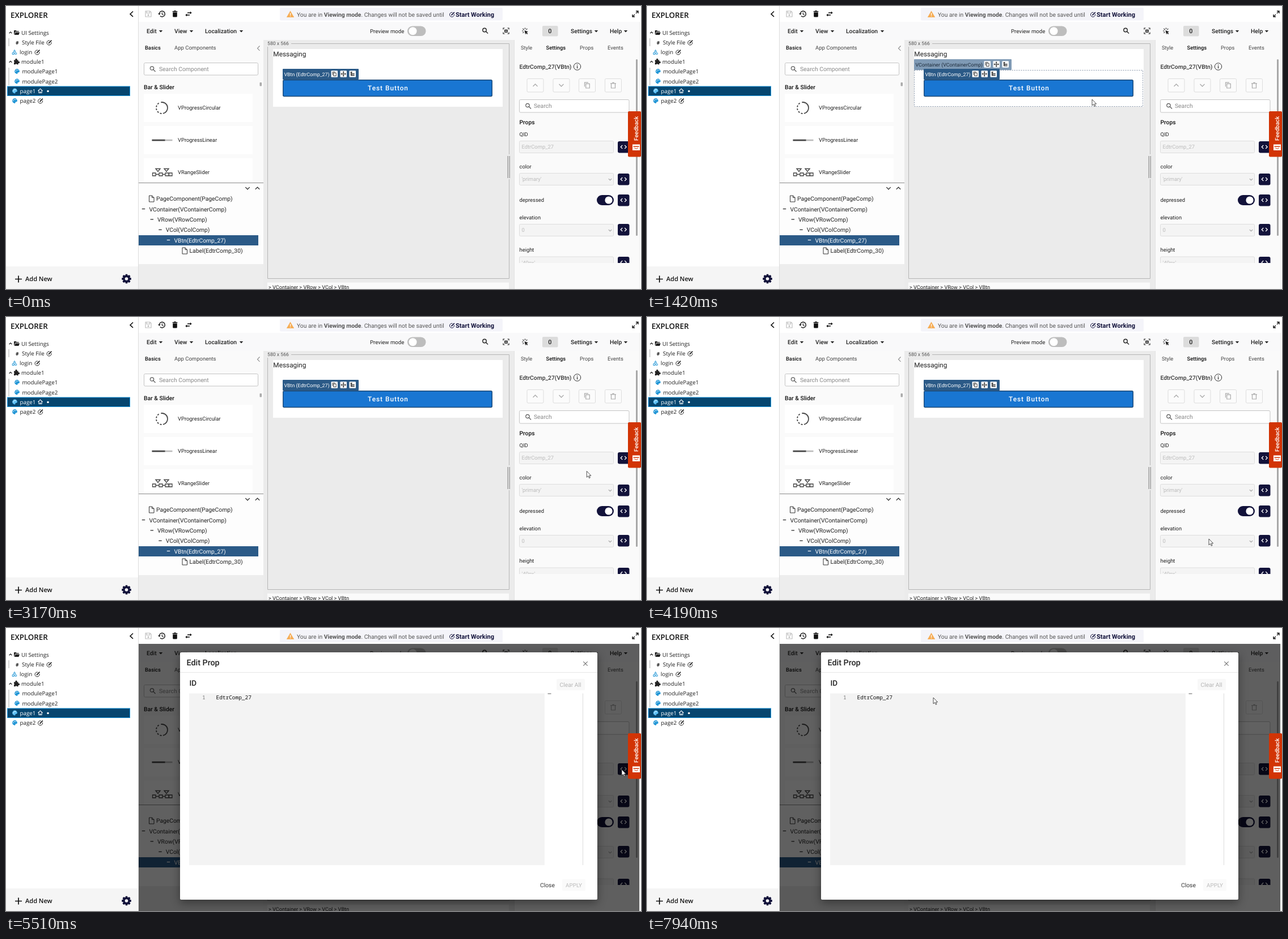
An HTML page that plays this animation: 1120x500 px, repeating every 7.99 s.

```html
<!DOCTYPE html>
<html lang="en">
<head>
<meta charset="utf-8">
<title>Component editor</title>
<style>
html, body { margin: 0; width: 100%; height: 100%; overflow: hidden; background: #fff; }
svg { display: block; width: 1120px; height: 500px; }
text { white-space: pre; text-rendering: geometricPrecision; }
</style>
</head>
<body>
<svg id="stage" viewBox="0 0 1120 500"></svg>
<script>
const INK = '#212121', NAVY = '#12123a', BLUE = '#2b5a87';
const ROBOTO = 'Roboto, sans-serif', OPEN = "'Open Sans', sans-serif", MONO = "'Noto Sans Mono', monospace";

// Drawing helpers: each returns SVG markup
const text = (x, y, str, size = 10.3, fill = INK, weight = 400, font = ROBOTO, extra = '') =>
  `<text x="${x}" y="${y}" font-size="${size}" fill="${fill}" font-weight="${weight}" font-family="${font}" ${extra}>${str}</text>`;
const rect = (x, y, w, h, fill, extra = '') =>
  `<rect x="${x}" y="${y}" width="${w}" height="${h}" fill="${fill}" ${extra}/>`;
const box = (x, y, w, h, fill, stroke, r = 2) =>
  rect(x + .5, y + .5, w - 1, h - 1, fill, `stroke="${stroke}" rx="${r}"`);
const line = (d, stroke = INK, width = 1.2, fill = 'none') =>
  `<path d="${d}" stroke="${stroke}" stroke-width="${width}" fill="${fill}"/>`;
const fill = (d, color = INK) => `<path d="${d}" fill="${color}" fill-rule="evenodd"/>`;
const dot = (x, y, r, color, stroke = 'none', w = 1) =>
  `<circle cx="${x}" cy="${y}" r="${r}" fill="${color}" stroke="${stroke}" stroke-width="${w}"/>`;
const at = (x, y, ...parts) => `<g transform="translate(${x} ${y})">${parts.join('')}</g>`;
const group = (id, ...parts) => `<g id="${id}">${parts.join('')}</g>`;

// Icons, centred on x, y
const edit = (x, y, c = INK) => at(x, y,
  line('M3.4 -.5A4 4 0 1 1 .5 -3.4', c, 1), line('M-1.5 1.6L3.8 -3.8', c, 1.7));
const palette = (x, y, c = '#2196d6') => at(x, y,
  fill('M0 -4.4A4.4 4.4 0 0 0 0 4.4C1.4 4.4 .4 2.4 1.6 1.9C3 1.5 4.4 2 4.4 0A4.4 4.4 0 0 0 0 -4.4Z', c),
  dot(-2.4, -.2, .8, '#fff'), dot(-.9, -2.4, .8, '#fff'), dot(1.5, -2.3, .8, '#fff'));
const magnifier = (x, y, c = '#555', w = 1.2) => at(x, y, dot(-1, -1, 3.2, 'none', c, w), line('M1.4 1.4L5 5', c, w));
const chevron = (x, y, s, dir, c = INK, w = 1.3) => at(x, y, line(`M${-s} ${-s * dir / 2}L0 ${s * dir / 2}L${s} ${-s * dir / 2}`, c, w));
const caret = (x, y) => fill(`M${x - 3.2} ${y - 1.5}h6.4l-3.2 3.4z`);
const trash = (x, y, c) => at(x, y, line('M-3.5 -3V5H3.5V-3M-5 -3.2H5M-1.7 -4.6H1.7', c, 1.2));
const copy = (x, y, c, s = 1) => `<g transform="translate(${x} ${y}) scale(${s})">` +
  line('M-4.5 2.5V-4.8H2', c, 1.2) + line('M-2.3 -2.6H4.3V5H-2.3Z', c, 1.2) + '</g>';
const page = (x, y) => at(x, y, line('M-4 -5.5H1L4.5 -2V5.5H-4ZM1 -5.5V-2H4.5', '#333', 1));
const minus = (x, y, c = INK) => rect(x - 2.7, y - .6, 5.4, 1.2, c);
const codeButton = y => rect(1079, y - 10, 20.5, 20.5, NAVY, 'rx="3"') +
  at(1089.2, y, line('M-2 -3L-5 0L-2 3M2 -3L5 0L2 3', '#fff', 1.3));
const tag = (x, y, w, color, label, ink) => {
  const tool = (dx, d) => rect(x + w + dx, y + 3.2, 11.5, 11.5, '#fff', 'rx="1"') + at(x + w + dx + 5.7, y + 9, d);
  return rect(x, y, w, 19, color, 'rx="1"') + text(x + 2.5, y + 12.8, label, 8.8, ink) +
    tool(-48.5, copy(0, 0, INK, .7)) +
    tool(-32.5, line('M-4 0H4M0 -4V4', INK, 1) + fill('M-4.7 0l2-1.7v3.4zM4.7 0l-2-1.7v3.4zM0 -4.7l1.7 2h-3.4zM0 4.7l1.7-2h-3.4z')) +
    tool(-16.5, line('M-3.5 -3H-.5M-2.5 -3V2.7H3.5M-2.5 0H3.5', INK, 1.3));
};

const explorer = () => {
  const row = (x, y, str, c = INK) => text(x, y + 3.6, str, 9.8, c, 400, OPEN);
  return rect(0, 0, 234, 500, '#fff') + rect(0, 460, 233, 40, '#f5f5f5') + rect(233, 0, 1, 500, '#ddd') +
    text(8, 21, 'EXPLORER', 13.3, '#111', 600, OPEN) + line('M224 9.5L219 14.2L224 19', '#111', 1.6) +
    chevron(8, 47, 2.4, -1) + fill('M14 43h3.7l1 1.2h4v1.3h-6.6l-1.5 4.5h-.6zM16.5 46.4h7.5l-1.6 4.6h-7.6z') + row(27, 47, 'UI Settings') +
    rect(4.5, 57, 1, 14, '#aaa') + text(17, 67.5, '#', 8.5, INK, 700, OPEN) + row(28, 64, 'Style File') + edit(76.5, 64.5) +
    at(15, 81.5, line('M0 -4L2 -.7H-2ZM-3.8 1H-.8V4H-3.8Z', '#2196d6', 1), dot(2.2, 2.5, 1.6, 'none', '#2196d6')) +
    row(24, 81.5, 'login') + edit(55.5, 81.5) +
    chevron(8, 98.5, 2.4, -1) + fill('M14 95.5h2.6a1.7 1.7 0 1 1 2.8 0h2.3v2.6a1.6 1.6 0 1 1 0 2.7v2.4h-2.5a1.4 1.4 0 0 0-2.6 0H14v-2.7a1.5 1.5 0 0 0 0-2.6z') +
    row(27, 98.5, 'module1') + rect(4.5, 109, 1, 31, '#aaa') +
    palette(33.5, 115.5) + row(28 + .8 + 0, 115.5, '').replace('28.8', '40') + row(28.5, 115.5, '') +
    '';
};

const modules = () => {
  const row = (x, y, str, c = INK) => text(x, y + 3.6, str, 9.8, c, 400, OPEN);
  return palette(19.5, 115.5) + row(28.5, 115.5, 'modulePage1') + palette(19.5, 133) + row(28.5, 133, 'modulePage2') +
    rect(2.5, 142, 216, 16.5, '#06466f', 'stroke="#1b94dc"') + palette(15.5, 150, '#5cc0f5') + row(24.5, 150, 'page1', '#fff') +
    line('M56.5 150L60.5 146.2L64.5 150M58 149.5V153.5H63V149.5M60.5 153.5V151', '#fff', 1.1) + dot(74, 150.5, 1.8, '#fff') +
    palette(15.5, 167.5) + row(24.5, 167.5, 'page2') + edit(61, 167.5) +
    line('M16 482.5H28M22 476.5V488.5', '#111', 1.7) + text(34, 486.3, 'Add New', 11, '#111', 600, OPEN) +
    at(212.5, 482, [0, 45, 90, 135].map(a => rect(-1.9, -8.3, 3.8, 16.6, NAVY, `rx="1" transform="rotate(${a})"`)).join(''),
      dot(0, 0, 6.4, NAVY), dot(0, 0, 2.8, '#f5f5f5'));
};

const topBar = () => rect(234, 0, 886, 28, '#fff') +
  at(251, 14, line('M-5 -5H3L5 -3V5H-5ZM-3 -4.5V-1.5H2.5V-4.5', '#bbb', 1.1), dot(0, 2, 1.5, '#bbb')) +
  at(275, 14, line('M-4.7 -.5A5 5 0 1 1 -3.2 3.6', INK, 1.4), fill('M-7 -1h4.8l-2.4 3z'), line('M.3 -2.7V.5L2.6 2', INK, 1.2)) +
  at(298, 14, fill('M-4.3 -5h2.3l.7-1h2.6l.7 1h2.3v1.4h-8.6zM-3.8 -2.8h7.6v7q0 1.3-1.3 1.3h-5q-1.3 0-1.3-1.3z', '#111')) +
  at(322, 14, line('M-2 2H-5M-4 2H2M-2 -2H4', '#111', 1.3), fill('M-5.7 2l3-2.5v5zM5.7 -2l-3-2.5v5z', '#111')) +
  rect(483, 3, 393, 22.5, '#f4f4f9', 'rx="2"') +
  fill('M501.5 8.5l6.7 11.5h-13.4z', '#f6ad55') + rect(500.9, 12.5, 1.3, 3.6, '#fff') + rect(500.9, 17, 1.3, 1.3, '#fff') +
  text(513, 18.6, 'You are in <tspan font-weight="700">Viewing mode</tspan>. Changes will not be saved until', 10.3, '#555') +
  edit(787, 14.8, NAVY) + text(793, 18.8, 'Start Working', 11, NAVY, 700) +
  at(1110, 14, line('M1 -1L4.5 -4.5M-1 1L-4.5 4.5', '#111', 1.3), line('M1 -5H5V-1M-1 5H-5V1', '#111', 1.4));

const navBar = () => rect(234, 28, 886, 32, '#f9f9fa') +
  [[248, 'Edit', 273], [297, 'View', 327], [351, 'Localization', 415], [996, 'Settings', 1041], [1065, 'Help', 1093]]
    .map(([x, str, cx]) => text(x, 48, str, 10.3, INK, 500) + caret(cx, 44.5)).join('') +
  text(642, 47.8, 'Preview mode', 9.6) + rect(708, 35.5, 32.5, 17.5, '#bdbdbd', 'rx="8.7"') + dot(717.5, 44.2, 7, '#fff') +
  magnifier(845, 43.5, INK, 1.4) +
  at(882, 44, line('M-5 -2.5V-5H-2.5M2.5 -5H5V-2.5M5 2.5V5H2.5M-2.5 5H-5V2.5', INK, 1.2), line('M-2.5 -2H2.5V2.5H-2.5ZM-2.5 0H2.5M0 -2V2.5', INK, 1)) +
  at(915.5, 44, fill('M-1 -1l6.5 2.5-2.7 1.2 2 2-1.2 1.2-2-2-1 2.5z'), line('M-2 -2L-4 -4M0 -3V-5.5M-3 0H-5.5M2 -2.2L3.7 -4M-2.3 2L-4 3.7', INK, 1.1)) +
  rect(946, 35, 27.5, 18.5, '#dcdcdc', 'rx="2"') + text(956.3, 48, '0', 10.8, INK, 500);

const palettePanel = () => rect(234, 60, 220, 253, '#fafafa') +
  text(245, 77, 'Basics', 9.3, '#111', 500) + text(297, 77, 'App Components', 9.5, '#444') + line('M447.5 70.5L443.5 74.7L447.5 79', '#888', 1.1) +
  box(243, 100, 202, 22.5, '#fff', '#c4c4c4') + magnifier(258.5, 111) + text(270, 114.8, 'Search Component', 10.3, '#888') +
  rect(447.5, 135, 3.5, 6.5, '#aaa', 'rx="1"') + text(243, 146.5, 'Bar &amp; Slider', 10.3, '#111', 500) +
  rect(243, 155, 192, 50, '#fff') + rect(243, 212, 192, 50, '#fff') + rect(243, 269, 192, 43, '#fff') +
  '<circle cx="275" cy="180" r="10" fill="none" stroke="#444" stroke-width="1.8" stroke-dasharray="31 2.5 3 2.5 3 2.5 3 2.5 3 2.5 3 5" transform="rotate(-100 275 180)"/>' +
  rect(257.5, 235.8, 36, 2.6, '#bbb') + rect(257.5, 235.8, 23, 2.6, '#444') +
  line('M258.5 295H264V300H258.5ZM287.5 295H293V300H287.5ZM264 297.5H270M276 297.5H281M270 295H276V300H270ZM281 295H287V300H281Z', '#444', 1.3) +
  line('M264 287.5H272L268 292.5ZM279 287.5H287L283 292.5Z', '#444', 1.4) +
  [['VProgressCircular', 183], ['VProgressLinear', 240.3], ['VRangeSlider', 297.3]].map(([s, y]) => text(303, y, s, 9.4)).join('');

const tree = () => rect(234, 312, 220, 144, '#fdfdfd') + rect(234, 312, 220, 1, '#8a8a8a') +
  chevron(426, 322, 3.7, 1) + chevron(443.5, 322, 3.7, -1) + rect(234, 405, 211, 18, BLUE) +
  page(256.5, 340.5) + page(315, 432.5) + minus(242.5, 358.5) + minus(257.3, 377) + minus(272, 395.3) + minus(286.5, 413.5, '#fff') +
  ['PageComponent(PageComp)', 'VContainer(VContainerComp)', 'VRow(VRowComp)', 'VCol(VColComp)', 'VBtn(EdtrComp_27)', 'Label(EdtrComp_30)']
    .map((s, i) => text([265, 252.5, 267, 281.7, 296.5, 323.5][i], 344.4 + i * 18.35, s, 10.3, i == 4 ? '#fff' : INK)).join('');

const canvasArea = () => rect(454, 60, 443, 440, '#ebebeb') +
  line('M503 66.5H887.5V262M887.5 306V481.5H461.5V72', '#b5b5b5', 1) + text(461, 69.3, '580 x 566', 8.7, '#555') +
  rect(471, 76, 405, 102, '#fff') + text(471.3, 89.3, 'Messaging', 11.85) +
  group('hover',
    rect(471.5, 113.5, 403, 64, 'none', 'stroke="#8795a8" stroke-dasharray="2 2"'),
    tag(471, 94, 172, '#7f9ab5', 'VContainer (VContainerComp)', '#1c2b3a')) +
  rect(488.7, 130.7, 368.6, 28.8, '#1976d2', 'stroke="#1f4b78" stroke-width="1.4" rx="2"') +
  text(638, 149.4, 'Test Button', 11.8, '#fff', 500, ROBOTO, 'letter-spacing="1"') +
  tag(488, 111, 134, BLUE, 'VBtn (EdtrComp_27)', '#fff') +
  rect(884.5, 265, 1.4, 39, '#999') + rect(887.5, 265, 1.4, 39, '#999') +
  rect(461, 488.5, 426, 12, '#fafafa') + text(463, 499.8, '&gt; VContainer &gt; VRow &gt; VCol &gt; VBtn', 9.15);

const settings = () => {
  const field = (y, str, select) => box(905, y, 167, 22, '#f4f4f4', '#ddd') + text(909.5, y + 14.4, str, 9.4, '#bbb') +
    (select ? chevron(1065.5, y + 11.5, 2.6, 1, '#999', 1.1) : '');
  return rect(896, 60, 221, 440, '#fafafa') + rect(1117, 28, 3, 472, '#fff') + rect(1117, 28, 1, 472, '#eee') + rect(896, 60, 1, 440, '#e2e2e2') +
    text(908, 77, 'Style', 9.3, '#444') + text(952.5, 77, 'Settings', 9.4, '#111', 500) + text(1012, 77, 'Props', 9.3, '#444') + text(1061, 77, 'Events', 9.4, '#444') +
    text(905.5, 110.8, 'EdtrComp_27(VBtn)', 10.3, '#333', 500) + dot(1007.5, 107, 6.2, 'none', '#333') + rect(1006.9, 106, 1.3, 4.3, '#333') + rect(1006.9, 103.5, 1.3, 1.4, '#333') +
    [933.5, 979.5, 1025, 1071].map(x => box(x - 15, 128, 30, 24.5, '#fbfbfb', '#ddd')).join('') +
    chevron(933.5, 140, 4, -1, '#aaa') + chevron(979.5, 140, 4, 1, '#aaa') + copy(1025, 140, '#aaa') + trash(1071, 140, '#aaa') +
    box(905, 165, 194.5, 23.5, '#fff', '#c4c4c4') + magnifier(921, 176.5) + text(931, 180.2, 'Search', 10.3, '#888') +
    text(905.5, 208.5, 'Props', 10.3, '#111', 500) +
    [['QID', 230.3], ['color', 286.6], ['depressed', 345.8], ['elevation', 376.7], ['height', 434]].map(([s, y]) => text(905.5, y, s, 9.4)).join('') +
    field(238, 'EdtrComp_27') + field(295, "'primary'", 1) + field(385, '0', 1) +
    rect(1042, 334, 30, 18, NAVY, 'rx="9"') + dot(1063, 343, 6.6, '#fff') +
    [249, 306, 343, 395].map(codeButton).join('') +
    '<clipPath id="fold"><path d="M896 440H1117V454H896Z"/></clipPath><g clip-path="url(#fold)">' + field(442.5, "'40px'") + codeButton(453) + '</g>' +
    rect(1111, 94, 3, 312, '#a8a8a8', 'rx="1.5"');
};

const dialog = () => rect(234, 28, 883, 472, '#000', 'opacity=".62"') +
  rect(307, 43, 736, 437, '#fff', 'rx="2" style="filter:drop-shadow(0 5px 8px #0006)"') +
  rect(307, 78, 736, 1, '#e6e6e6') + text(318.5, 66, 'Edit Prop', 14.3, '#222', 500) +
  line('M1018.3 59.3L1025.7 66.7M1025.7 59.3L1018.3 66.7', '#777', 1.2) +
  text(323.5, 102.3, 'ID', 13.5, '#222', 500) + rect(971, 90, 50, 20, '#f8f8f8', 'rx="2"') + text(976.5, 103.5, 'Clear All', 10.3, '#b5b5b5') +
  rect(323, 115.5, 627, 303.5, '#f3f3f3') + rect(1017, 115.5, 1, 303.5, '#ddd') + rect(955.5, 115.5, 6, 1.2, '#777') +
  text(346, 125.8, '1', 9.45, '#777', 400, MONO) + text(370.5, 125.8, 'EdtrComp_27', 9.45, '#111', 400, MONO) +
  text(942, 458, 'Close', 10.3, '#333') + rect(981, 444, 41, 20.5, '#fafafa', 'rx="2"') + text(987, 458, 'APPLY', 9.9, '#bbb');

const feedback = () => rect(1097, 186, 23, 80.5, '#d23405', 'rx="2"') +
  text(0, 0, 'Feedback', 10, '#fff', 500, ROBOTO, 'transform="translate(1114.5 238) rotate(-90)"') +
  fill('M1105 244.5h13v10.5h-13zM1106.5 246v3h10v-3z', '#fff') + rect(1106, 245.5, 11, 2, '#fff') +
  line('M1108.5 250.5Q1111.5 254 1114.5 250.5', '#d23405', 1.1);

const cursor = () => group('cursor',
  group('arrow', line('M0 0V10.8L2.6 8.5L4.3 12.3L6 11.6L4.4 7.9H7.6Z', '#222', .8, '#fff')),
  group('hand', line('M0 1Q1 -.7 2 1V5Q3.4 4.2 3.8 5.4Q5.2 4.8 5.4 6Q6.8 5.8 6.8 7.2V10Q6.8 12 5.8 13.5H.4Q-.4 11 -2.4 8.6Q-2.2 7 0 8.6Z', '#111', .9, '#fff')));

// The explorer's base and its module rows share one column
const column = () => explorer().split(palette(33.5, 115.5))[0] + modules();

document.getElementById('stage').innerHTML = column() + topBar() + navBar() + rect(234, 456, 220, 44, '#ededed') +
  palettePanel() + tree() + canvasArea() + settings() + group('dialog', dialog()) + feedback() + cursor();

const LOOP = 7990, STEP = 70, OPENS = 5510;
// Pointer path: time, x, y
const path = [
  [320, 973, 447], [460, 755, 255], [660, 755, 255], [1000, 777, 163], [1420, 785, 165], [1690, 800, 175], [1970, 1023, 238],
  [2100, 1067, 256], [2420, 1067, 256], [2570, 1042, 246], [2760, 1042, 246], [3520, 1003, 304], [3650, 1003, 306],
  [3900, 983, 350], [4190, 991, 392], [4400, 1098, 320], [4470, 1098, 320], [5210, 1087, 252], [5270, 1087, 250],
  [5510, 1086, 250], [5740, 1086, 250], [5880, 629, 213], [6090, 629, 213], [6510, 414, 128], [6750, 414, 128],
  [7020, 401, 118], [7160, 401, 118], [7440, 389, 121], [7940, 505, 123], [LOOP, 505, 123]
];

const pointerAt = t => {
  const i = Math.max(1, path.findIndex(k => k[0] > t));
  const [t0, x0, y0] = path[i - 1], [t1, x1, y1] = path[i];
  const steps = Math.max(1, Math.round((t1 - t0) / STEP));
  const p = Math.floor((t - t0) / (t1 - t0) * steps) / steps;
  return [x0 + (x1 - x0) * p, y0 + (y1 - y0) * p];
};

const el = id => document.getElementById(id);
const show = (id, on) => { el(id).style.display = on ? '' : 'none'; };

function draw(now) {
  const t = now % LOOP, [x, y] = pointerAt(t);
  const overCode = t > 4470 && t < OPENS && (Math.abs(y - 306) < 10 || Math.abs(y - 249) < 10);
  show('cursor', t >= 320);
  el('cursor').setAttribute('transform', `translate(${x} ${y})`);
  show('hand', overCode);
  show('arrow', !overCode);
  show('hover', t > 660 && t < 1750 && y < 178);
  show('dialog', t >= OPENS);
  requestAnimationFrame(draw);
}
requestAnimationFrame(draw);
</script>
</body>
</html>
```
